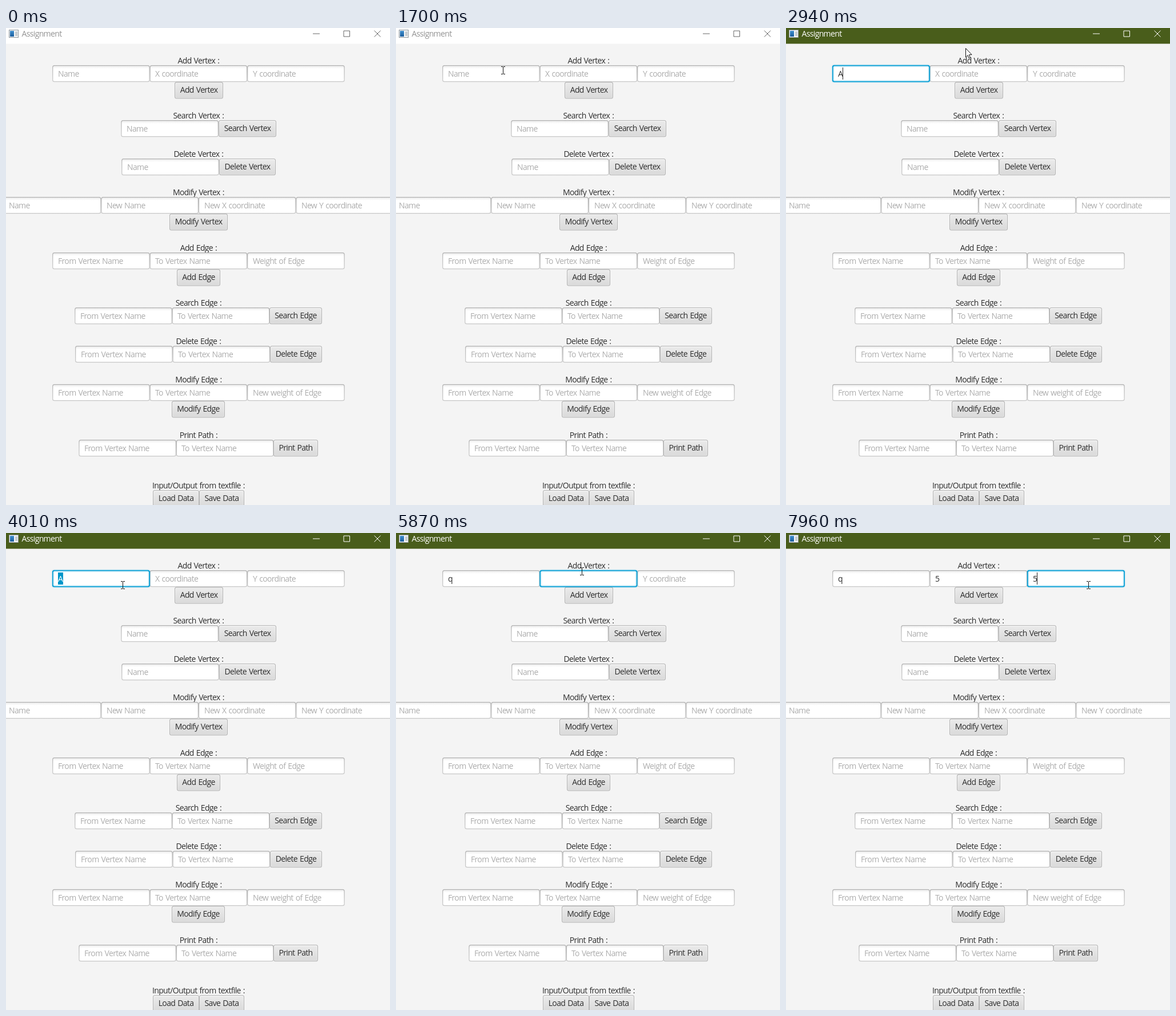
An HTML page with a canvas for the animation above (8 s loop, 672 by 833 pixels).

```html
<!DOCTYPE html>
<html lang="en">
<head>
<meta charset="utf-8">
<title>Assignment</title>
<style>
  html, body { margin: 0; width: 100%; height: 100%; overflow: hidden; background: #f4f4f4; }
  canvas { display: block; }
</style>
</head>
<body>
<canvas id="stage" width="672" height="833"></canvas>
<script>
const ctx = document.getElementById('stage').getContext('2d');
const LOOP = 8000, STEP = 77, BLINK = 460, PRESS = 80;
const MID = 336.9, H = 29.3, FIELD_W = 170.5, ROW = 67.1, PAD = 19;
const INK = '#2e2e2e';

ctx.font = '14px "Open Sans", "Noto Sans", sans-serif';
ctx.letterSpacing = '-0.65px';
ctx.wordSpacing = '1px';

const groups = {
  'Add Vertex': ['Name', 'X coordinate', 'Y coordinate'],
  'Search Vertex': ['Name'],
  'Delete Vertex': ['Name'],
  'Modify Vertex': ['Name', 'New Name', 'New X coordinate', 'New Y coordinate'],
  'Add Edge': ['From Vertex Name', 'To Vertex Name', 'Weight of Edge'],
  'Search Edge': ['From Vertex Name', 'To Vertex Name'],
  'Delete Edge': ['From Vertex Name', 'To Vertex Name'],
  'Modify Edge': ['From Vertex Name', 'To Vertex Name', 'New weight of Edge'],
  'Print Path': ['From Vertex Name', 'To Vertex Name']
};

const labels = [], fields = [], buttons = [];
const buttonWidth = label => ctx.measureText(label).width + PAD;

function addButton(label, x, y) {
  const w = buttonWidth(label);
  buttons.push({ label, x: Math.round(x), y, w: Math.round(w) });
  return x + w;
}

// every row is centred; three or more fields push the button onto its own line
function layout() {
  let top = 64.7;
  for (const [name, prompts] of Object.entries(groups)) {
    const y = Math.round(top), stacked = prompts.length > 2;
    const w = buttonWidth(name), span = prompts.length * FIELD_W;
    const x = MID - (span + (stacked ? 0 : w)) / 2;
    labels.push({ label: name + ' :', y: y - 3 });
    prompts.forEach((prompt, i) => fields.push({ prompt, x: x + i * FIELD_W, y, w: FIELD_W }));
    if (stacked) addButton(name, MID - w / 2, y + H);
    else addButton(name, x + span, y);
    top += ROW + (stacked ? H : 0);
  }
  const y = Math.round(top + 21), both = buttonWidth('Load Data') + buttonWidth('Save Data');
  labels.push({ label: 'Input/Output from textfile :', y: y - 3 });
  addButton('Save Data', addButton('Load Data', MID - both / 2, y), y);
}
layout();

// the pointer goes straight from one place to the next: start, end, x, y
const entry = { x: 330, y: 840 };
const legs = [
  [530, 920, 388, 560], [1000, 1310, 285, 263], [1390, 1700, 187, 74],
  [2710, 2940, 314, 35], [3020, 3170, 324, 77], [3400, 3630, 204, 91],
  [4560, 4950, 323, 59], [5020, 5330, 325, 67],
  [6480, 6870, 608, 284], [6950, 7250, 529, 91]
];
const clicks = [[1930, 0], [3780, 0], [5330, 1], [7250, 2]];
const keys = [[2710, 0, 'A'], [4640, 0, 'q'], [6100, 1, '5'], [7960, 2, '5']];

const smooth = u => u * u * (3 - 2 * u);
const inside = (p, b) => p.x >= b.x && p.x < b.x + b.w && p.y >= b.y && p.y < b.y + H;
const lastBefore = (list, t) => list.filter(e => e[0] <= t).pop();

function pointerAt(t, click) {
  if (t < legs[0][0]) return null;
  let p = entry;
  for (const [start, end, x, y] of legs) {
    if (t < start) break;
    const n = Math.round((end - start) / STEP);
    const k = Math.min(n, Math.floor((t - start) / (end - start) * n + 0.1));
    const u = smooth((k + 1) / (n + 1));
    p = { x: Math.round(p.x + (x - p.x) * u), y: Math.round(p.y + (y - p.y) * u) };
  }
  // a press shows the arrow for a moment, slightly raised
  if (click && t < click[0] + PRESS) return { x: p.x, y: p.y - 10, beam: false };
  return { ...p, beam: fields.some(f => inside(p, f)) };
}

function stateAt(t) {
  const click = lastBefore(clicks, t), focus = click ? click[1] : -1;
  const typed = i => lastBefore(keys.filter(k => k[1] === i), t);
  const key = typed(focus);
  const since = click ? t - Math.max(click[0] + PRESS, key ? key[0] : 0) : -1;
  const selected = !!key && key[0] < click[0] && since >= 0;
  return {
    focus, selected,
    value: i => (typed(i) || [0, 0, ''])[2],
    caret: !selected && since >= 0 && Math.floor(since / BLINK) % 2 === 0,
    pointer: pointerAt(t, click)
  };
}

function text(str, x, y, color, align = 'left') {
  ctx.fillStyle = color;
  ctx.textAlign = align;
  ctx.fillText(str, x, y);
}

function rect(x, y, w, h, fill) {
  ctx.fillStyle = fill;
  ctx.fillRect(x, y, w, h);
}

function layer({ x, y, w }, inset, r, fill) {
  ctx.fillStyle = fill;
  ctx.beginPath();
  ctx.roundRect(x + inset, y + inset, w - 2 * inset, H - 2 * inset, r);
  ctx.fill();
}

function shade(y0, y1, from, to) {
  const g = ctx.createLinearGradient(0, y0, 0, y1);
  g.addColorStop(0, from);
  g.addColorStop(1, to);
  return g;
}

function drawField(f, value, focused, state) {
  const { x, y, prompt } = f;
  if (focused) {
    layer(f, -0.25, 3.5, '#039ed3');
    layer(f, 1.5, 2.5, '#fff');
    layer(f, -1.5, 4.5, 'rgba(3,158,211,.13)');
    layer(f, 3.5, 1, '#fff');
  } else {
    layer(f, 0, 3.5, shade(y, y + H, '#b2b2b2', '#c8c8c8'));
    layer(f, 1.2, 2.5, shade(y + 1, y + 6, '#ececec', '#fff'));
  }
  const tx = Math.round(x + 9.6), end = Math.round(tx + ctx.measureText(value).width);
  const selected = focused && state.selected;
  if (selected) rect(tx, y + 4, end - tx + 1, 21, '#0096c9');
  if (value) text(value, tx, y + 20, selected ? '#fff' : INK);
  else if (!focused) text(prompt, tx, y + 20, '#adadad');
  if (focused && state.caret) rect(value ? end : tx, y + 4, 1, 21, '#222');
}

function drawButton(b, pointer) {
  const hot = pointer && inside(pointer, b), { y } = b;
  layer(b, 0, 3.5, '#b5b5b5');
  layer(b, 1.1, 2.5, hot ? '#f6f6f6' : shade(y, y + H, '#f6f6f6', '#e0e0e0'));
  layer(b, 2.2, 2, hot ? '#ececec' : shade(y, y + H, '#ebebeb', '#d9d9d9'));
  text(b.label, b.x + b.w / 2, Math.round(y) + 19, INK, 'center');
}

function drawTitle(active) {
  rect(0, 0, 672, 27.5, active ? '#495d1b' : '#fff');
  rect(5, 3, 17, 14, '#8b949b');
  rect(6, 4, 15, 12, '#f5f7f8');
  rect(7, 5, 7, 10, shade(5, 15, '#3f8fcf', '#1c5d9c'));
  rect(16, 6, 4, 8, '#c5cbd0');
  text('Assignment', 27.5, 15, active ? '#fff' : '#949494');
  ctx.strokeStyle = active ? '#fff' : '#666';
  ctx.lineWidth = 1;
  ctx.beginPath();
  ctx.moveTo(537, 10); ctx.lineTo(549, 10);
  ctx.rect(591, 5, 10.5, 10);
  ctx.moveTo(644.5, 4.5); ctx.lineTo(655.5, 15.5);
  ctx.moveTo(655.5, 4.5); ctx.lineTo(644.5, 15.5);
  ctx.stroke();
}

function drawPointer({ x, y, beam }) {
  ctx.save();
  ctx.translate(x, y);
  ctx.lineWidth = 1;
  ctx.strokeStyle = '#111';
  ctx.fillStyle = '#fff';
  ctx.beginPath();
  if (beam) {
    ctx.moveTo(0.5, -6); ctx.lineTo(0.5, 6);
    for (const v of [-6.5, 6.5]) {
      ctx.moveTo(-3, v); ctx.lineTo(0, v);
      ctx.moveTo(1, v); ctx.lineTo(4, v);
    }
  } else {
    ctx.moveTo(0.5, 0.5);
    ctx.lineTo(0.5, 16); ctx.lineTo(4, 12.7);
    ctx.lineTo(6.3, 17.8); ctx.lineTo(8.5, 16.8);
    ctx.lineTo(6.3, 11.8); ctx.lineTo(11, 11.5);
    ctx.closePath();
    ctx.fill();
  }
  ctx.stroke();
  ctx.restore();
}

function draw(t) {
  const state = stateAt(t), { focus, pointer } = state;
  rect(0, 0, 672, 833, '#f4f4f4');
  drawTitle(focus >= 0);
  labels.forEach(l => text(l.label, MID, l.y, INK, 'center'));
  fields.forEach((f, i) => i !== focus && drawField(f, state.value(i), false, state));
  buttons.forEach(b => drawButton(b, pointer));
  if (focus >= 0) drawField(fields[focus], state.value(focus), true, state);
  if (pointer) drawPointer(pointer);
}

const begin = performance.now();
function tick() {
  draw((performance.now() - begin) % LOOP);
  requestAnimationFrame(tick);
}
draw(0);
requestAnimationFrame(tick);
</script>
</body>
</html>
```
